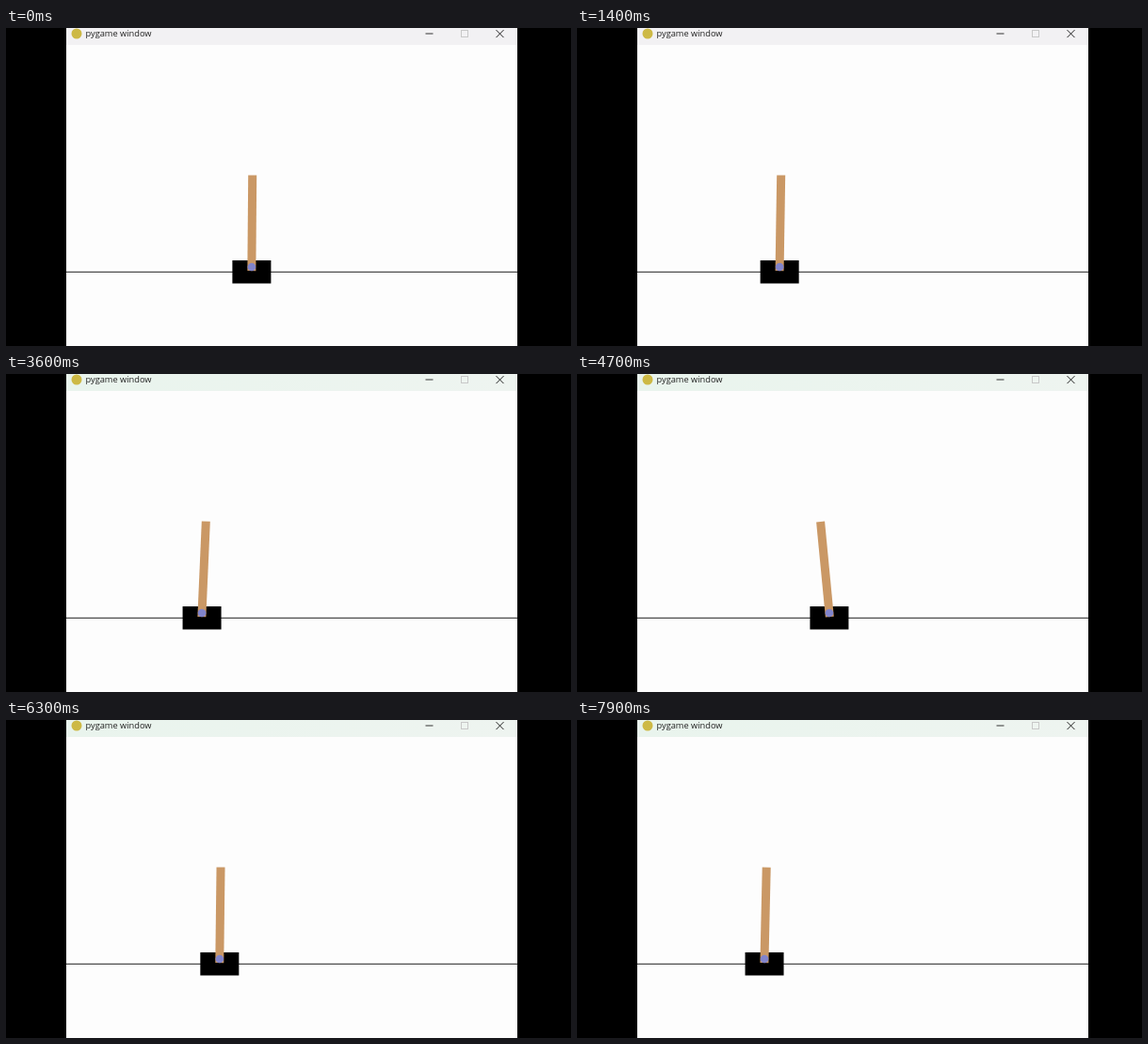
Recreate the animation shown at these times as an HTML page with a canvas. Size 600 by 338 pixels, loop 8000 ms.

```html
<!DOCTYPE html>
<html lang="en">
<head>
<meta charset="utf-8">
<title>Cart and pole</title>
<style>
html, body { margin: 0; width: 100%; height: 100%; overflow: hidden; background: #000; }
canvas { display: block; width: 600px; height: 338px; }
</style>
</head>
<body>
<canvas id="stage"></canvas>
<script>
const LOOP = 8000, STEP = 100;
const CYCLE = 5350;                  // time from one glide to the next
const REST = 2800, PEAK = 4980;      // turning points within a cycle
const LEFT = 198.4, RIGHT = 274.9, GLIDE = 260.9;
const WIN_X = 64, WIN_W = 479;

const canvas = document.getElementById('stage');
const ctx = canvas.getContext('2d');
const scale = window.devicePixelRatio || 1;
canvas.width = 600 * scale;
canvas.height = 338 * scale;

const mix = (a, b, p) => a + (b - a) * p;
const clamp = v => Math.max(0, Math.min(1, v));
const smooth = p => p * p * (3 - 2 * p);
const bump = (t, centre, width) => Math.exp(-(((t - centre) / width) ** 2));

// The cart glides left to rest, swings right to a peak, then drops back.
function cartX(t) {
  const s = t % CYCLE;
  if (s < REST) return mix(LEFT, GLIDE, (1 - s / REST) ** 1.9);
  if (s < PEAK) return mix(LEFT, RIGHT, smooth(((s - REST) / (PEAK - REST)) ** 1.5));
  return mix(RIGHT, GLIDE, ((s - PEAK) / (CYCLE - PEAK)) ** 1.3);
}

// Sideways offset of the pole tip: slow sway, a lean right, a hard lean left
function poleLean(t) {
  return 1.5 - 0.7 * Math.cos(2 * Math.PI * t / CYCLE)
    + 2.6 * bump(t, 3500, 400) - 10.4 * bump(t, 4680, 400);
}

function rect(color, x, y, w, h) {
  ctx.fillStyle = color;
  ctx.fillRect(x, y, w, h);
}

function disc(color, x, y, r) {
  ctx.fillStyle = color;
  ctx.beginPath();
  ctx.arc(x, y, r, 0, Math.PI * 2);
  ctx.fill();
}

function line(color, x0, y0, x1, y1) {
  ctx.strokeStyle = color;
  ctx.beginPath();
  ctx.moveTo(x0, y0);
  ctx.lineTo(x1, y1);
  ctx.stroke();
}

function drawWindow(t) {
  rect('#000', 0, 0, 600, 338);
  rect('#fdfdfd', WIN_X, 0, WIN_W, 338);
  rect('#f2f1f3', WIN_X, 0, WIN_W, 18);

  const mint = ctx.createLinearGradient(WIN_X, 0, WIN_X + WIN_W, 0);
  mint.addColorStop(0, '#e9f4ed');
  mint.addColorStop(1, '#eef4f0');
  ctx.globalAlpha = clamp((t - 2500) / 400);
  rect(mint, WIN_X, 0, WIN_W, 18);
  ctx.globalAlpha = 1;

  disc('#cdb945', 75, 6, 5.5);
  ctx.fillStyle = '#222';
  ctx.font = '9.25px "Open Sans", "Noto Sans", sans-serif';
  ctx.fillText('pygame window', 84.5, 9.2);

  line('#333', 445.5, 6, 453.5, 6);
  ctx.strokeStyle = '#c8c8c8';
  ctx.strokeRect(483.5, 2.5, 7, 7);
  line('#222', 520.5, 2.1, 528.5, 10.1);
  line('#222', 528.5, 2.1, 520.5, 10.1);
}

function drawCart(x, lean) {
  rect('#222', WIN_X, 258.8, WIN_W, 1);
  rect('#000', x - 20.5, 247, 41, 24.5);

  ctx.save();
  ctx.translate(x, 254);
  ctx.rotate(Math.atan2(lean, 97.5));
  rect('#ca9865', -4.5, -97.5, 9, 101.6);
  disc('#8184cb', 0, 0, 4.3);
  ctx.restore();
}

function draw(now) {
  const t = Math.floor((now % LOOP) / STEP) * STEP;
  ctx.setTransform(scale, 0, 0, scale, 0, 0);
  drawWindow(t);
  drawCart(cartX(t), poleLean(t));
}

let start = null;
function tick(now) {
  if (start === null) start = now;
  draw(now - start);
  requestAnimationFrame(tick);
}
draw(0);
requestAnimationFrame(tick);
</script>
</body>
</html>
```
